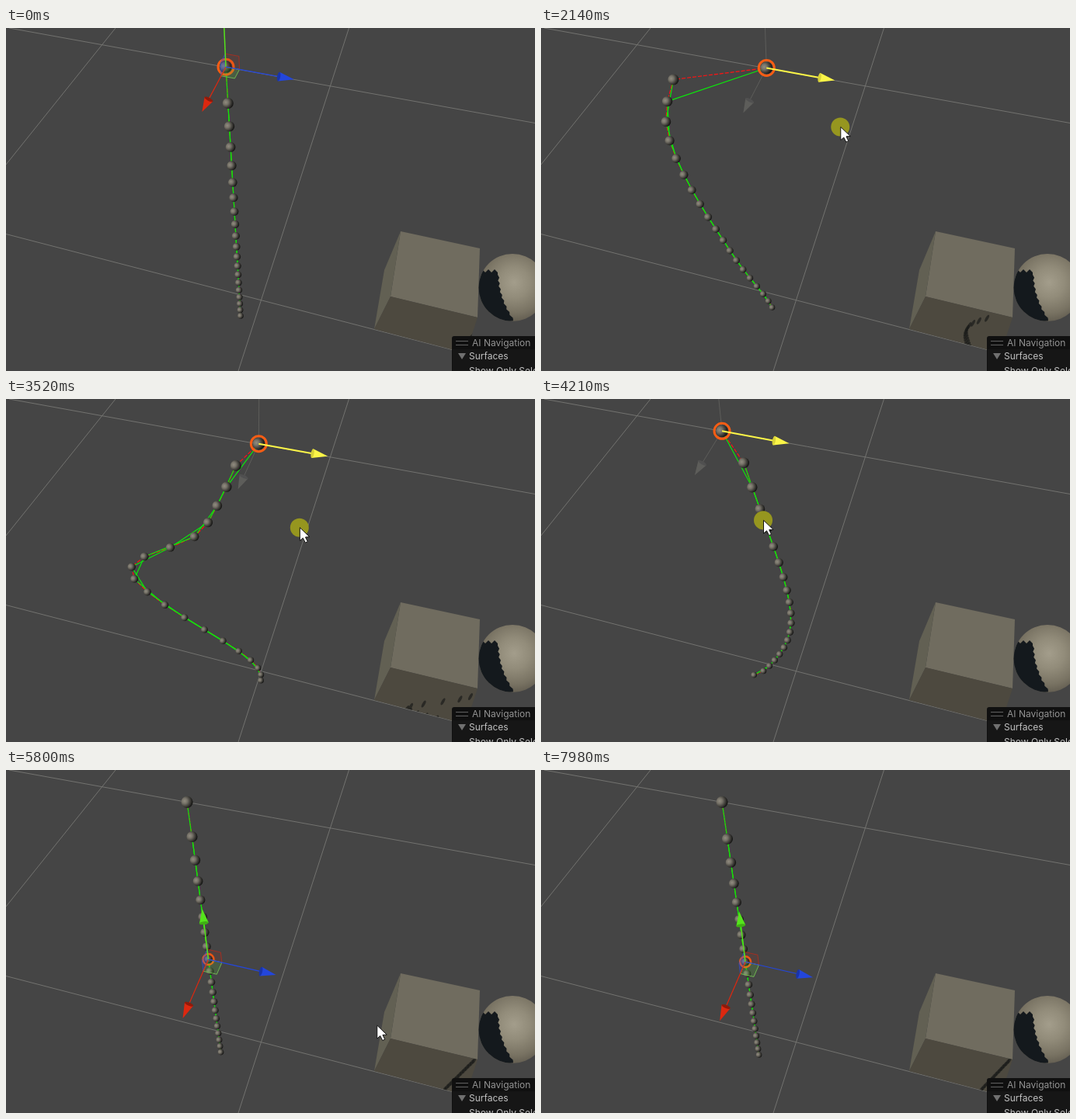
Write an HTML page with a canvas that moves like this. It is 681 by 442 pixels and loops after 8000 ms.

```html
<!DOCTYPE html>
<html lang="en">
<head>
<meta charset="utf-8">
<title>Rope simulation</title>
<style>
  html, body { margin: 0; width: 100%; height: 100%; overflow: hidden; background: #454545; }
  canvas { display: block; }
</style>
</head>
<body>
<canvas id="stage" width="681" height="442"></canvas>
<script>
const ctx = document.getElementById('stage').getContext('2d');
const LOOP = 8000;
const DRAG_START = 930, DRAG_END = 4400, SELECT_AT = 5200;
const CURSOR_IN = 70, CURSOR_OUT = 6690;
const BEADS = 20, HOME_X = 283, HOME_Y = 50, AXIS_SLOPE = 0.178;
const BEAD_TONES = ['#918c80', '#777369', '#45433e', '#161615'];
const BALL_TONES = ['#a39d8b', '#928c7a', '#797363', '#544f45'];

// Keys are [time, value, ...].
const HANDLE = [[930, 283], [1290, 190], [1720, 120], [2140, 290], [2430, 352],
  [2890, 59], [3070, 232], [3450, 328], [4160, 233]];
const LIFT = [[930, 0], [2800, 14], [7000, 0]];
const GRAB = [[930, 65, 19], [2140, 95, 76], [2900, 52, 96], [4210, 53, 115]];
const CURSOR = [[70, 648, 387], [800, 348, 69], [4400, 286, 156], [5200, 265, 246], [5800, 477, 329], [6600, 622, 395]];

// Smooth interpolation that never overshoots its keys.
function track(keys, t, col = 1) {
  const last = keys.length - 1;
  if (t <= keys[0][0]) return keys[0][col];
  if (t >= keys[last][0]) return keys[last][col];
  const rate = k => (keys[k + 1][col] - keys[k][col]) / (keys[k + 1][0] - keys[k][0]);
  const slope = k => {
    if (k === 0 || k === last) return 0;
    const a = rate(k - 1), b = rate(k);
    return a * b <= 0 ? 0 : 2 * a * b / (a + b);
  };
  let k = 0;
  while (t > keys[k + 1][0]) k++;
  const span = keys[k + 1][0] - keys[k][0], u = (t - keys[k][0]) / span;
  const ease = u * u * (3 - 2 * u);
  return keys[k][col] * (1 - ease) + keys[k + 1][col] * ease
    + span * u * (1 - u) * ((1 - u) * slope(k) - u * slope(k + 1));
}

// Leftover sway of the rope's end once the handle has stopped.
function swing(t) {
  const s = Math.max(0, (t - 4300) / 1000);
  return -30 * Math.exp(-0.7 * s) * Math.sin(2 * Math.PI * s / 1.2);
}

// Each bead repeats the handle's motion later and more softly than the one above.
function beadAt(i, t) {
  const n = i ? i - 1 : -1.36;
  const restY = 97 + 528 * n / (n + 16.7);
  const depth = (restY - HOME_Y) / 321, scale = 1 - 0.58 * depth;
  const delay = i ? 230 + 48 * i : 0, blur = i ? 15 + 3 * i : 0;
  const handle = [-1, 0, 1].reduce((sum, k) => sum + track(HANDLE, t - delay + k * blur), 0) / 3;
  const world = handle + swing(t) * i / (BEADS - 1);
  const shift = scale * (world - HOME_X);
  return {
    world,
    x: HOME_X + 19 * depth + shift,
    y: restY + AXIS_SLOPE * shift - (i ? track(LIFT, t) : 0),
    r: 7.6 - 3.8 * depth
  };
}

function shape(points, fill, stroke) {
  ctx.beginPath();
  points.forEach(([x, y]) => ctx.lineTo(x, y));
  ctx.closePath();
  if (fill) { ctx.fillStyle = fill; ctx.fill(); }
  if (stroke) { ctx.strokeStyle = stroke; ctx.lineWidth = 1; ctx.stroke(); }
}

function line(x1, y1, x2, y2, color, width = 1) {
  ctx.strokeStyle = color;
  ctx.lineWidth = width;
  ctx.beginPath();
  ctx.moveTo(x1, y1);
  ctx.lineTo(x2, y2);
  ctx.stroke();
}

function ellipse(x, y, rx, ry, angle, fill) {
  ctx.fillStyle = fill;
  ctx.beginPath();
  ctx.ellipse(x, y, rx, ry, angle, 0, 7);
  ctx.fill();
}

function shadedBall(x, y, r, lightX, lightY, tones) {
  const lx = x + lightX * r, ly = y + lightY * r;
  const g = ctx.createRadialGradient(lx, ly, 0, lx, ly, r * 1.35);
  tones.forEach((c, i) => g.addColorStop(i / (tones.length - 1), c));
  ellipse(x, y, r, r, 0, g);
}

const drawBead = b => shadedBall(b.x, b.y, b.r, -0.4, -0.18, BEAD_TONES);

function drawGround() {
  ctx.fillStyle = '#454545';
  ctx.fillRect(0, 0, 681, 442);
  const grid = '#72726f';
  line(4, 0, 681, 122.5, grid);
  line(141, 0, 0, 176, grid);
  line(441.5, 0, 299, 442, grid);
  line(0, 265.5, 580, 416, grid);
}

function drawCube(beads) {
  const base = [[495, 346], [607, 373], [592, 419], [474, 388]];
  shape([[508, 262], [610, 284], [607, 373], [495, 346]], '#706c5f');
  shape([[508, 262], [495, 346], [474, 388], [487, 312]], '#626053');
  shape(base, '#4d493f');
  // The rope's shadow falls on the lower face.
  ctx.save();
  shape(base);
  ctx.clip();
  for (let i = 1; i < 14; i++) {
    const u = i / 13, x = 606 - 39 * u + 0.38 * (beads[i].world - 233);
    ellipse(x, 371 + 41 * u, 5, 1.8, -1.05, 'rgba(24,25,23,.65)');
  }
  ctx.restore();
}

function drawBigBall() {
  const x = 652, y = 334.5, r = 43.5;
  shadedBall(x, y, r, 0.05, -0.15, BALL_TONES);
  ctx.save();
  ctx.beginPath();
  ctx.arc(x, y, r, 0, 7);
  ctx.clip();
  const edge = [[600, 318]];
  for (let n = 0; n < 7; n++) edge.push([609 + 4 * n, n % 2 ? 311 : 315]);
  for (let n = 0; n <= 16; n++) edge.push([633 + 20 * (n / 16) ** 2 + (n % 2) * 2, 318 + n * 3.7]);
  shape([...edge, [600, 385]], '#14191d');
  ctx.restore();
}

function drawPanel() {
  ctx.fillStyle = '#101010';
  ctx.beginPath();
  ctx.roundRect(574, 397, 120, 60, 3);
  ctx.fill();
  ctx.fillStyle = '#161616';
  ctx.fillRect(575, 414, 106, 28);
  line(579, 403.5, 595, 403.5, '#606060');
  line(579, 408.5, 595, 408.5, '#606060');
  shape([[582, 419], [592, 419], [587, 427]], '#707070');
  ctx.font = '12px Inter, sans-serif';
  ctx.fillStyle = '#939393';
  ctx.fillText('AI Navigation', 600, 410);
  ctx.fillStyle = '#c2c2c2';
  ctx.fillText('Surfaces', 596, 427);
  ctx.fillText('Show Only Selected', 596, 446);
}

function drawRope(beads) {
  const link = (a, b, color) => b && line(a.x, a.y, b.x, b.y, color, 1.2);
  ctx.setLineDash([5, 2]);
  beads.forEach((b, i) => link(b, beads[i + 1], '#ff1212'));
  ctx.setLineDash([]);
  beads.forEach((b, i) => link(b, beads[i + 2], '#0be80b'));
  beads.forEach(drawBead);
}

function drawArrow(x, y, [dx, dy], color, shade, width) {
  const len = Math.hypot(dx, dy), cone = Math.min(20, len * 0.28), half = 6;
  const ux = dx / len, uy = dy / len;
  const bx = x + dx - ux * cone, by = y + dy - uy * cone;
  line(x, y, bx, by, color, width);
  shape([[bx - uy * half, by + ux * half], [x + dx, y + dy], [bx + uy * half, by - ux * half]], color);
  ellipse(bx, by, half, 2, Math.atan2(ux, -uy), shade);
}

function drawGizmo(bead, onRoot, dragging, hovered) {
  const { x, y } = bead, d = 290 - x;
  const red = onRoot ? [-30 - 0.092 * d, 58 - 0.018 * d] : [-33, 76];
  const green = onRoot ? [-3 - 0.1 * d, -85] : [-8, -65];
  const blue = onRoot ? [88 - 0.026 * d, 16] : [87, 20];
  const ring = () => {
    ctx.strokeStyle = '#f85d14';
    ctx.lineWidth = onRoot ? 3 : 2.4;
    ctx.beginPath();
    ctx.arc(x, y, onRoot ? 10 : 7, 0, 7);
    ctx.stroke();
  };
  if (dragging) {
    drawArrow(x, y, green, '#5d5d5a', '#555', 1);
    drawArrow(x, y, red, '#5d5d5a', '#505050', 1);
    drawBead(bead);
    ring();
    drawArrow(x, y, blue, '#fbf547', '#d8d238', 2);
    return;
  }
  ring();
  const plane = (a, b, fill, stroke) => {
    const [ax, ay, bx, by] = [...a, ...b].map(v => v * 0.2);
    shape([[x, y], [x + ax, y + ay], [x + ax + bx, y + ay + by], [x + bx, y + by]], fill, stroke);
  };
  plane(blue, green, 'rgba(170,40,30,.14)', 'rgba(190,40,25,.75)');
  plane(red, green, 'rgba(40,70,220,.3)', 'rgba(50,80,220,.6)');
  plane(blue, red, 'rgba(90,190,60,.2)', 'rgba(120,205,85,.8)');
  drawArrow(x, y, red, '#dc2810', '#8f1a0a', 1.2);
  drawArrow(x, y, green, '#55e41c', '#3fae14', 1.5);
  drawArrow(x, y, blue, hovered ? '#0a42ff' : '#2346dc', '#1a34a8', hovered ? 2 : 1.2);
}

function drawCursor(t, root, dragging) {
  if (t < CURSOR_IN || t > CURSOR_OUT) return;
  const x = dragging ? root.x + track(GRAB, t, 1) : track(CURSOR, t, 1);
  const y = dragging ? root.y + track(GRAB, t, 2) : track(CURSOR, t, 2);
  if (dragging || Math.abs(t - SELECT_AT) < 60) ellipse(x, y, 12, 12, 0, '#96961f');
  const arrow = [[0, 0], [0, 17], [4, 13.5], [7, 19.5], [10, 18], [7.2, 12.3], [12.5, 12]];
  shape(arrow.map(([ax, ay]) => [x + 0.5 + ax, y + ay]), '#fff', '#111');
}

function draw(t) {
  const beads = Array.from({ length: BEADS }, (_, i) => beadAt(i, t));
  const onRoot = t < SELECT_AT;
  const dragging = t >= DRAG_START && t < DRAG_END;
  drawGround();
  drawCube(beads);
  drawBigBall();
  drawRope(beads);
  drawGizmo(beads[onRoot ? 0 : 8], onRoot, dragging, t > 780 && t < DRAG_START);
  drawPanel();
  drawCursor(t, beads[0], dragging);
}

ctx.lineJoin = 'round';
const start = performance.now();
function tick() {
  draw((performance.now() - start) % LOOP);
  requestAnimationFrame(tick);
}
tick();
</script>
</body>
</html>
```
